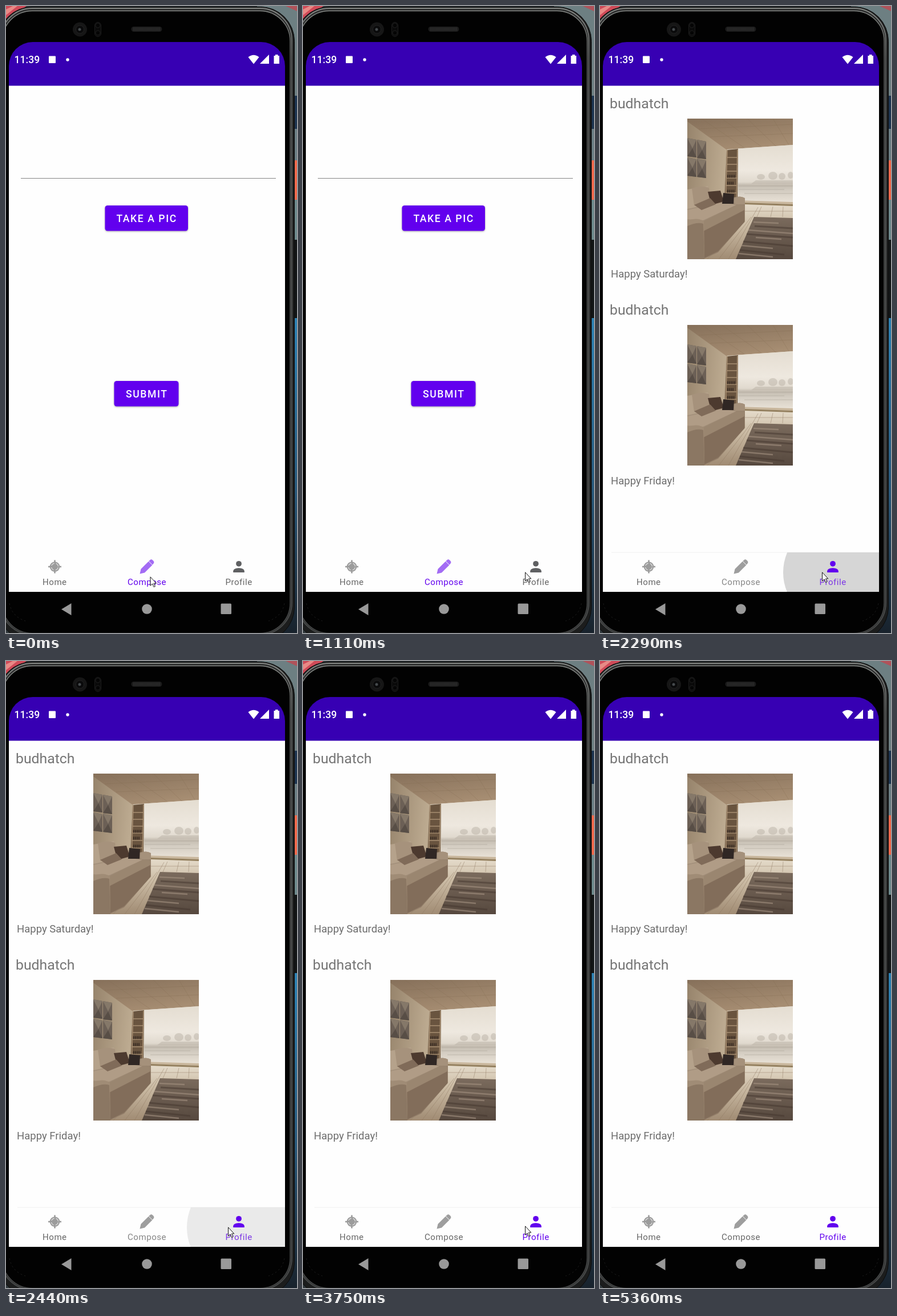
Animation of 510 by 1097 pixels, one loop 8060 ms. Source, as an HTML page:

```html
<!DOCTYPE html>
<html lang="en">
<head>
<meta charset="utf-8">
<title>Phone tabs</title>
<style>
  html, body { margin: 0; width: 100%; height: 100%; overflow: hidden; background: #000; }
  svg { display: block; width: 100%; height: 100%; }
  text { font-family: Roboto, "Noto Sans", sans-serif; }
  .clock { font-size: 17.6px; font-weight: 500; fill: #fff; }
  .btn text { font-size: 17.6px; font-weight: 500; letter-spacing: 1.57px; fill: #fff; }
  .btn rect { fill: #6200ee; filter: drop-shadow(0 1.5px 1.5px #0005); }
  .name { font-size: 24.8px; fill: #757575; }
  .note { font-size: 18.5px; fill: #6d6d6d; }
  .tab { font-size: 15.1px; letter-spacing: .5px; fill: #666; }

  /* one loop = 8060 ms, every change is a hard step */
  .a { animation: 8060ms step-end infinite; }
  #form { animation-name: form; }
  #feed { animation-name: feed; }
  #line { animation-name: line; }
  #ripple { animation-name: ripple; }
  #pencil { animation-name: pencil; }
  #compose { animation-name: compose; }
  #person { animation-name: person; }
  #profile { animation-name: profile; }
  #cursor { animation-name: cursor; }

  @keyframes form { 0% { opacity: 1 } 26.798%, 100% { opacity: 0 } }
  @keyframes feed { 0% { opacity: 0 } 28.411%, 100% { opacity: 1 } }
  @keyframes line { 0% { opacity: 0 } 26.798%, 100% { opacity: 1 } }
  @keyframes ripple {
    0% { opacity: 0; cx: 399px; r: 70px }
    26.798% { opacity: 1; cx: 399px; r: 70px }
    28.411% { opacity: 1; cx: 409px; r: 88px }
    30.272% { opacity: .5; cx: 409px; r: 92px }
    31.885%, 100% { opacity: 0; cx: 409px; r: 92px }
  }
  @keyframes pencil { 0% { fill: #a36cf4 } 26.798%, 100% { fill: #9e9e9e } }
  @keyframes compose {
    0% { fill: #6200ee }
    26.798% { fill: #757575 }
    28.411% { fill: #858585 }
    31.885%, 100% { fill: #666 }
  }
  @keyframes person { 0% { fill: #5f6062 } 26.798%, 100% { fill: #6200ee } }
  @keyframes profile {
    0% { fill: #666 }
    26.798% { fill: #6200ee }
    28.411% { fill: #7d38e4 }
    31.885%, 100% { fill: #6200ee }
  }
  @keyframes cursor {
    0% { transform: translate(252.5px, 998px); opacity: 1 }
    8.808% { transform: translate(328px, 996px); opacity: 1 }
    10.669% { transform: translate(364px, 993px); opacity: 1 }
    12.22% { transform: translate(384px, 991px); opacity: 1 }
    13.771% { transform: translate(389px, 990px); opacity: 1 }
    46.525% { transform: translate(389px, 988px); opacity: 1 }
    63.026% { transform: translate(392px, 1002px); opacity: 1 }
    64.887% { transform: translate(397px, 1062px); opacity: 1 }
    66.5%, 100% { transform: translate(397px, 1062px); opacity: 0 }
  }
</style>
</head>
<body>
<svg viewBox="0 0 510 1097" preserveAspectRatio="none">
  <defs>
    <linearGradient id="wall" x2="1" y2=".2">
      <stop stop-color="#96836b"/><stop offset="1" stop-color="#bcaa90"/>
    </linearGradient>
    <linearGradient id="ceil" x2=".5" y2="1">
      <stop stop-color="#86705a"/><stop offset="1" stop-color="#a68d72"/>
    </linearGradient>
    <linearGradient id="view" x2="0" y2="1">
      <stop stop-color="#e4ddd1"/><stop offset=".45" stop-color="#eee8df"/>
      <stop offset=".65" stop-color="#e0d9ce"/><stop offset=".7" stop-color="#c4bcb0"/>
      <stop offset=".8" stop-color="#d3ccc1"/><stop offset="1" stop-color="#e8e1d6"/>
    </linearGradient>
    <linearGradient id="seat" x2="1" y2="1">
      <stop stop-color="#a89580"/><stop offset="1" stop-color="#89745f"/>
    </linearGradient>
    <linearGradient id="floor" x2="0" y2="1">
      <stop offset=".62" stop-color="#e3d9c8"/><stop offset=".75" stop-color="#cdbea7"/><stop offset="1" stop-color="#a08b73"/>
    </linearGradient>
    <linearGradient id="rug" x2="0" y2="1">
      <stop stop-color="#7b6b5d"/><stop offset="1" stop-color="#56483e"/>
    </linearGradient>
    <linearGradient id="sea" x2="0" y2="1">
      <stop stop-color="#2d82b4"/><stop offset=".55" stop-color="#29587a"/><stop offset="1" stop-color="#18222c"/>
    </linearGradient>
    <linearGradient id="rim" x2="0" y2="1">
      <stop stop-color="#858885"/><stop offset=".08" stop-color="#565857"/><stop offset="1" stop-color="#464848"/>
    </linearGradient>
    <clipPath id="frame"><rect width="185" height="246"/></clipPath>
    <clipPath id="bar"><path d="M5 956H489V1025H5Z"/></clipPath>

    <g id="panel">
      <path fill="#6c6056" d="M0 0 16 3V34L0 32Z"/>
      <path fill="#857869" d="M0 0 16 3 9 18Z"/>
      <path fill="#584e46" d="M0 32 9 18 16 34Z"/>
    </g>

    <g id="photo" clip-path="url(#frame)">
      <rect width="185" height="246" fill="url(#floor)"/>
      <path fill="none" stroke="#8c775f" stroke-opacity=".45" d="M100 172 35 246M112 172 55 246M124 155 72 246M100 162H185M130 154 122 172M150 154 146 172M168 154 167 172"/>
      <path fill="url(#wall)" d="M0 0 70 52V150H0Z"/>
      <path fill="url(#ceil)" d="M0 0H185V46L68 54 0 5Z"/>
      <path fill="none" stroke="#806a52" stroke-opacity=".3" d="M25 0 100 51M60 0 130 49M105 0 155 48M150 0 178 46M20 18 185 10M40 32 185 26"/>
      <path fill="url(#view)" d="M89 52.500 185 46V146H89Z"/>
      <g fill="#b6aea2" opacity=".45">
        <ellipse cx="129" cy="102" rx="7" ry="5"/><ellipse cx="150" cy="100" rx="8" ry="7"/>
        <ellipse cx="166" cy="101" rx="6" ry="6"/><ellipse cx="181" cy="99" rx="5" ry="6"/>
        <path d="M120 108H185V114H112Z"/>
      </g>
      <path stroke="#a69c90" stroke-opacity=".5" d="M90 118H185M90 124H170M100 131H185"/>
      <path fill="#c9b79d" d="M89 143 185 146V150L89 147Z"/>
      <path fill="#94805f" d="M100 147 185 150V153L100 150Z"/>
      <path fill="#69543f" d="M69 55 89 53 88 146H65Z"/>
      <path fill="none" stroke="#a88f72" stroke-width="1.500" d="M70 55 67 146M88 54 86 146M69 68H87M69 80H87M68 92H87M68 104H87M67 117H87M67 130H86"/>
      <path stroke="#3e3026" stroke-width="5" stroke-dasharray="2 1" d="M70 101H84M70 113H81M70 127H83"/>
      <use href="#panel" y="34"/><use href="#panel" x="17" y="37"/>
      <use href="#panel" y="68"/><use href="#panel" x="17" y="70"/>

      <path fill="url(#rug)" d="M117 172 185 174V246H85Z"/>
      <path fill="none" stroke="#a39280" stroke-width="2.500" stroke-opacity=".6" d="M116 181 160 183M107 195 185 201M120 208 165 211M95 222 150 227M90 236 150 242"/>
      <path fill="none" stroke="#44372e" stroke-width="3" stroke-opacity=".5" d="M118 188 185 192M104 202 185 208M98 215 185 223M92 230 170 238"/>

      <path fill="#b5a28b" d="M0 124 36 118 42 138 20 160 0 160Z"/>
      <path fill="#a6927c" d="M8 122Q24 116 38 121L40 142 12 152Z"/>
      <path fill="url(#seat)" d="M0 158 70 144 80 138Q95 134 101 140V180L54 234 28 246H0Z"/>
      <path fill="#b09c86" d="M0 160 60 147 86 151 28 178 0 176Z"/>
      <path fill="#826d5a" d="M28 190 100 156V181L54 232 30 244Z"/>
      <path fill="#9a8670" d="M28 180 86 151 100 152V160L28 197Z"/>
      <path fill="#a5917b" d="M80 140Q92 134 101 139V150L84 150Z"/>
      <path fill="#4d3a2f" d="M36 128 58 126 64 145 42 151Z"/>
      <path fill="#302724" d="M63 130 82 132 81 149 61 149Z"/>
      <path fill="#806b59" d="M12 151 40 139 50 150 25 160Z"/>
      <path fill="#a08c76" d="M0 178Q20 172 29 180L30 246H0Z"/>
      <path fill="#8b7763" d="M0 188Q18 180 28 184L30 246H0Z"/>
    </g>
  </defs>

  <!-- desktop -->
  <rect width="510" height="1097" fill="#30383c"/>
  <path fill="#cf4a58" d="M0 0H36L0 26Z"/>
  <path fill="#e88a86" d="M0 6 12 0H20L0 16Z"/>
  <g transform="translate(440 0)">
    <rect width="70" height="158" fill="#6d7f82"/>
    <path fill="#b0525a" d="M50 0H70V9Z"/>
    <rect y="157" width="70" height="58" fill="#1d3550"/>
    <rect y="215" width="70" height="55" fill="#6b7e84"/>
    <rect y="270" width="70" height="69" fill="#f1694c"/>
    <rect y="339" width="70" height="70" fill="#6d898c"/>
    <rect y="409" width="70" height="137" fill="#121516"/>
    <rect y="546" width="70" height="551" fill="url(#sea)"/>
  </g>

  <!-- phone body -->
  <rect x="-14" y="1.500" width="519.500" height="1110" rx="60" fill="#1c1d1d" stroke="#0b0b0b"/>
  <rect x="-10" y="4" width="511" height="1096" rx="56" fill="#2b2c2c" stroke="url(#rim)" stroke-width="2"/>
  <rect x="-7" y="8.500" width="505" height="1089" rx="53" fill="#020202" stroke="url(#rim)" stroke-width="1.500"/>
  <circle cx="129.500" cy="41" r="12.500" fill="#161616"/>
  <circle cx="129.500" cy="41" r="7" fill="#0a0a0b" stroke="#222"/>
  <circle cx="129" cy="41" r="2.500" fill="#454a4d"/>
  <rect x="155.500" y="28.500" width="11" height="25" rx="5.500" fill="#0a0a0a" stroke="#1d1d1d"/>
  <circle cx="161" cy="34" r="4" fill="#050505" stroke="#1d1d1d"/>
  <circle cx="161" cy="47" r="4" fill="#050505" stroke="#1d1d1d"/>
  <rect x="219.500" y="36" width="54" height="9" rx="4.500" fill="#1b1b1b"/>
  <path stroke="#303030" stroke-width="6" stroke-dasharray="1 1" d="M223 40.500H270"/>
  <path fill="none" stroke="#1c1c1c" stroke-dasharray="3 4" d="M6 1045Q10 1068 34 1076M488 1045Q484 1068 460 1076"/>

  <!-- screen -->
  <path fill="#fefefe" d="M5 139H489V1025H5Z"/>
  <path fill="#3700b3" d="M5 139.500V105A42 42 0 0 1 47 63H447A42 42 0 0 1 489 105V139.500Z"/>
  <text class="clock" x="14.500" y="100">11:39</text>
  <g fill="#fff">
    <rect x="75" y="87.500" width="12" height="12.500" rx="1"/>
    <circle cx="108" cy="94" r="2.700"/>
    <path d="M424.500 89.500Q434 82 443.500 89.500L434 101.500Z"/>
    <path d="M461 85V101H445Z"/>
    <path d="M472 85H476.500V87H479V101H469.500V87H472Z"/>
  </g>

  <g id="form" class="a">
    <path stroke="#858585" stroke-width="1.200" d="M26 301.500H473"/>
    <g class="btn">
      <rect x="173.500" y="349" width="145.500" height="44.500" rx="4.500"/>
      <text x="193.500" y="378">TAKE A PIC</text>
      <rect x="189.500" y="656" width="113" height="44.500" rx="4.500"/>
      <text x="210" y="685">SUBMIT</text>
    </g>
  </g>

  <g id="feed" class="a">
    <text class="name" x="17" y="179">budhatch</text>
    <use href="#photo" x="153" y="197"/>
    <text class="note" x="19" y="475">Happy Saturday!</text>
    <text class="name" x="17" y="540">budhatch</text>
    <use href="#photo" x="153" y="558"/>
    <text class="note" x="19" y="837">Happy Friday!</text>
  </g>

  <!-- tabs -->
  <path id="line" class="a" stroke="#f0f0f0" d="M20 956H489"/>
  <g clip-path="url(#bar)">
    <circle id="ripple" class="a" cx="399" cy="991" r="70" fill="#d6d6d6"/>
  </g>
  <g transform="translate(85.500 981)" fill="none" stroke="#9c9c9c">
    <circle r="8.800" fill="#9c9c9c" stroke="none"/>
    <path stroke-width="2.600" d="M0-11.500V11.500M-11.500 0H11.500"/>
    <circle r="6" stroke="#e2e2e2" stroke-width="1.200" stroke-dasharray="6.400 3.020" stroke-dashoffset="-1.510"/>
  </g>
  <g id="pencil" class="a">
    <path d="M234.500 993.500 236.500 985 249.800 971.700 256.300 978.200 243 991.500Z"/>
    <path d="M250.300 971.200 253 968.800Q255 967.500 257 969.500L258.500 971Q260 973 258.800 975L256.800 977.700Z"/>
  </g>
  <g id="person" class="a">
    <circle cx="408" cy="975.800" r="4.900"/>
    <path d="M398.200 991V988.500Q399 983.500 408 983.300 417 983.500 417.800 988.500V991Z"/>
  </g>
  <text class="tab" x="64" y="1013">Home</text>
  <text id="compose" class="tab a" x="213" y="1013">Compose</text>
  <text id="profile" class="tab a" x="384.500" y="1013">Profile</text>

  <!-- system keys -->
  <g fill="#999">
    <path d="M97 1055.500 114.500 1045V1066Z"/>
    <circle cx="247" cy="1055" r="8.800"/>
    <rect x="376.500" y="1045.500" width="18.500" height="18.500" rx="1.500"/>
  </g>

  <g id="cursor" class="a">
    <path fill="#fff" stroke="#111" d="M.5.8V16.200L4.100 12.900 6.600 18.500 8.900 17.500 6.500 12H10.800Z"/>
  </g>
</svg>
</body>
</html>
```
